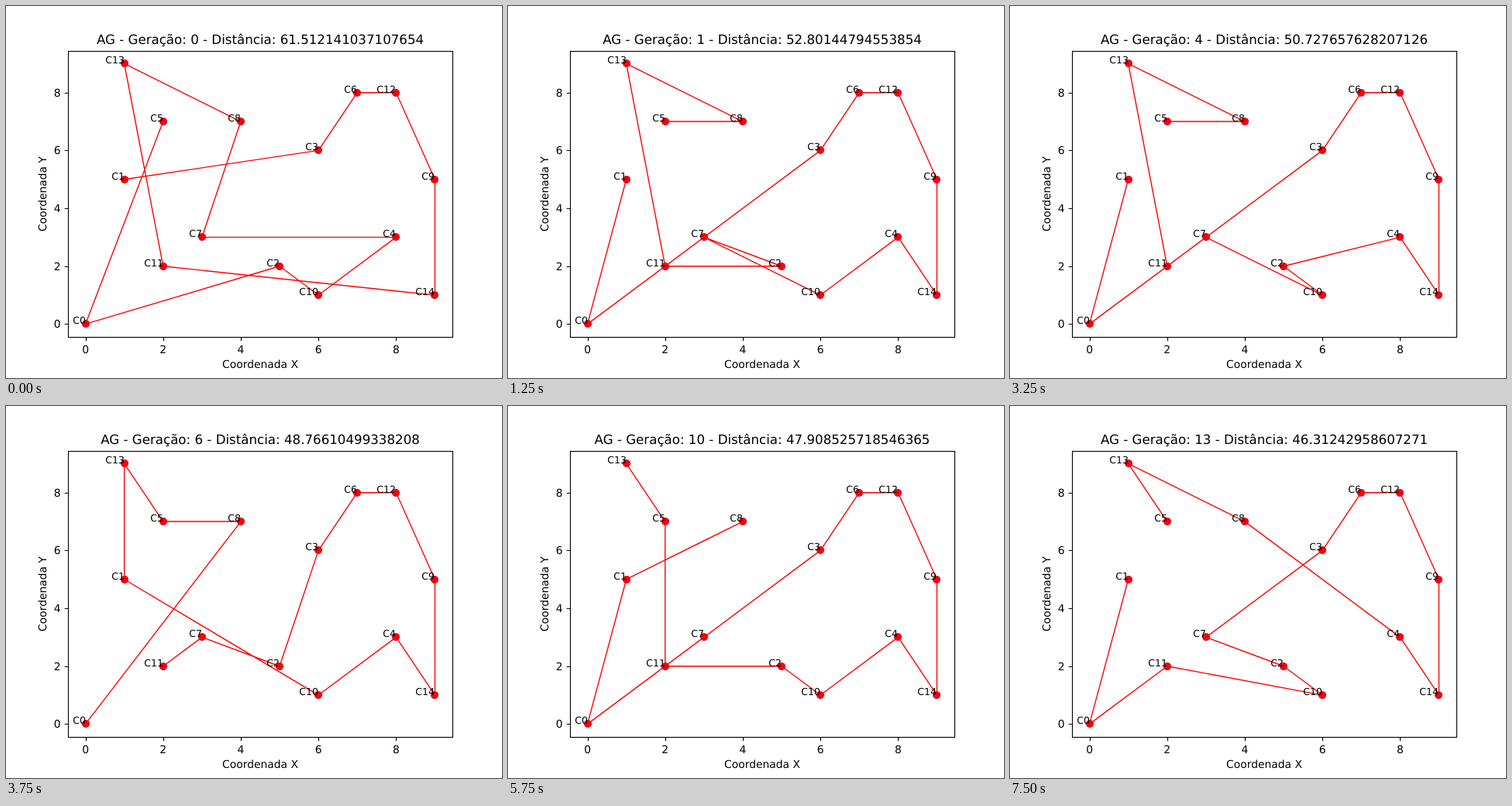
Animation, 640 px wide and 480 px high, one loop 8 s. Source, as an HTML page:

```html
<!DOCTYPE html>
<html lang="pt">
<head>
<meta charset="utf-8">
<title>AG</title>
<style>
  html, body { margin: 0; width: 100%; height: 100%; overflow: hidden; background: #fff; }
  svg { display: block; width: 640px; height: 480px; }
  text { font: 13.89px "DejaVu Sans", sans-serif; text-anchor: middle; text-rendering: geometricPrecision; }
  #title { font-size: 16.67px; }
  .tickY { text-anchor: end; }
  .city { font-size: 12.5px; text-anchor: end; }
  .axis { fill: none; stroke: #000; stroke-width: 1.11; }
  #route { fill: none; stroke: #f00; stroke-width: 1.39; stroke-linejoin: round; }
</style>
</head>
<body>
<svg id="chart" viewBox="0 0 640 480">
  <g id="under" fill="#00f"></g>
  <polyline id="route"/>
  <g id="over" fill="#f00"></g>
  <rect class="axis" x="80.5" y="58.5" width="496" height="369"/>
  <g id="ticks"></g>
  <g id="names"></g>
  <text id="title" x="328" y="49"></text>
  <text x="328" y="467">Coordenada X</text>
  <text transform="translate(52 242.5) rotate(-90)">Coordenada Y</text>
</svg>
<script>
const LOOP = 8000, STEP = 1250;
const cities = [[0, 0], [1, 5], [5, 2], [6, 6], [8, 3], [2, 7], [7, 8], [3, 3],
                [4, 7], [9, 5], [6, 1], [2, 2], [8, 8], [1, 9], [9, 1]];

// generation, distance, visiting order
const tours = [
  [0, '61.512141037107654', '5 0 2 10 4 7 8 13 11 14 9 12 6 3 1'],
  [1, '52.80144794553854', '5 8 13 11 2 7 10 4 14 9 12 6 3 0 1'],
  [4, '50.727657628207126', '5 8 13 11 7 10 2 4 14 9 12 6 3 0 1'],
  [6, '48.76610499338208', '0 8 5 13 1 10 4 14 9 12 6 3 2 7 11'],
  [10, '47.908525718546365', '13 5 11 2 10 4 14 9 12 6 3 7 0 1 8'],
  [12, '46.90496819655263', '5 13 3 10 2 4 14 9 12 6 8 7 11 0 1'],
  [13, '46.31242958607271', '5 13 8 4 14 9 12 6 3 7 2 10 11 0 1']
];

const $ = id => document.getElementById(id);
const px = x => 102.545 + x * 50.101;
const py = y => 410.4 - y * 37.333;

function add(parent, tag, attrs, text = '') {
  const el = document.createElementNS('http://www.w3.org/2000/svg', tag);
  for (const k in attrs) el.setAttribute(k, attrs[k]);
  el.textContent = text;
  $(parent).append(el);
}

for (let v = 0; v <= 8; v += 2) {
  const x = Math.round(px(v)) + 0.5, y = Math.round(py(v)) + 0.5;
  add('ticks', 'path', { class: 'axis', d: `M${x} 427.5v4.86M80.5 ${y}h-4.86` });
  add('ticks', 'text', { x: px(v), y: 448 }, v);
  add('ticks', 'text', { class: 'tickY', x: 70.5, y: y + 4.5 }, v);
}

cities.forEach(([x, y], i) => {
  const cx = Math.round(px(x)), cy = Math.round(py(y));
  for (const layer of ['under', 'over']) add(layer, 'circle', { cx, cy, r: 4.86 });
  add('names', 'text', { class: 'city', x: cx, y: cy }, 'C' + i);
});

let shown = -1;
function draw() {
  const n = Math.floor(performance.now() % LOOP / STEP);
  if (n !== shown) {
    const [gen, dist, order] = tours[shown = n];
    $('title').textContent = `AG - Geração: ${gen} - Distância: ${dist}`;
    $('route').setAttribute('points',
      order.split(' ').map(c => [px(cities[c][0]), py(cities[c][1])]).join(' '));
  }
  requestAnimationFrame(draw);
}
draw();
</script>
</body>
</html>
```
